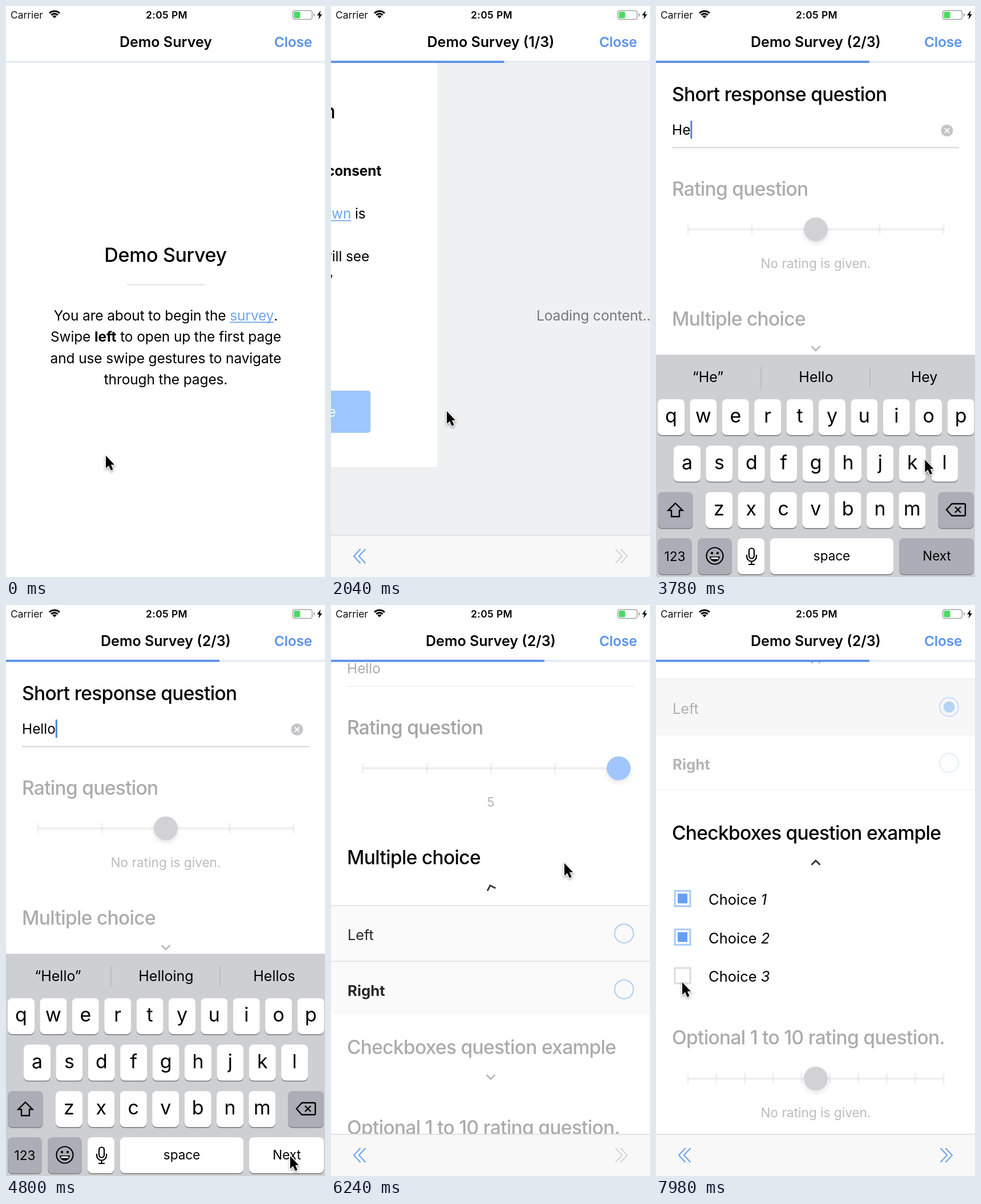
Animation of 559 by 1002 pixels, one loop 8000 ms. Source, as an HTML page with a canvas:

```html
<!DOCTYPE html>
<html lang="en">
<head>
<meta charset="utf-8">
<title>Survey demo</title>
<style>
html, body { margin: 0; width: 100%; height: 100%; overflow: hidden; background: #fff; }
canvas { display: block; width: 559px; height: 1002px; }
</style>
</head>
<body>
<canvas id="stage" width="559" height="1002"></canvas>
<script>
const ctx = document.getElementById('stage').getContext('2d');
const W = 559, H = 1002, LOOP = 8000;
const BLUE = '#649ff4', LINK = '#6ea6ef', GREY = '#d6d6d6';
let t = 0;

// ---- timing ----
const clamp = v => Math.max(0, Math.min(1, v));
const ease = p => p < .5 ? 2 * p * p : 1 - 2 * (1 - p) ** 2;
const ramp = (start, length) => ease(clamp((t - start) / length));
const mix = (a, b, p) => a + (b - a) * p;
const between = (a, b) => t >= a && t < b;

function track(keys) {
  const i = keys.findIndex(k => k[0] > t);
  if (i === 0) return keys[0].slice(1);
  if (i < 0) return keys[keys.length - 1].slice(1);
  const a = keys[i - 1], b = keys[i], p = ease((t - a[0]) / (b[0] - a[0]));
  return a.slice(1).map((v, j) => mix(v, b[j + 1], p));
}

const POINTER = [
  [60, 174, 787], [420, 62, 720], [860, 62, 720], [1080, 58, 611], [1220, 58, 611],
  [1600, 202, 709], [2400, 202, 709], [2900, 335, 800], [3080, 335, 800], [3400, 139, 722],
  [3540, 139, 722], [3800, 474, 795], [4120, 500, 800], [4290, 477, 722], [4380, 477, 722],
  [4720, 497, 965], [4920, 497, 965], [5380, 284, 394], [5480, 284, 394], [5880, 452, 396],
  [6000, 452, 396], [6200, 408, 451], [6260, 408, 451], [6560, 400, 540], [6780, 400, 540],
  [7460, 46, 515], [7640, 46, 515], [7780, 46, 584], [7860, 46, 584], [7980, 45, 660]
];
const KEY_TIMES = [3000, 3480, 3880, 4080, 4340];
const SUGGESTIONS = ['I|The|I’m', '“H”|Hey|Hello', '“He”|Hello|Hey', '“Hel”|Hello|Help',
  '“Hell”|Hello|Hells', '“Hello”|Helloing|Hellos'];
const FOCUS = [1900, 4860, 6000, 6800, 9e9, 9e9];
const FADE = 280;

// ---- drawing helpers ----
function box(x, y, w, h, fill, r = 0) {
  ctx.fillStyle = fill;
  ctx.beginPath();
  ctx.roundRect(x, y, w, h, r);
  ctx.fill();
}

function frame(x, y, w, h, color, width, r = 0) {
  ctx.strokeStyle = color;
  ctx.lineWidth = width;
  ctx.beginPath();
  ctx.roundRect(x, y, w, h, r);
  ctx.stroke();
}

function dot(x, y, r, fill) {
  ctx.fillStyle = fill;
  ctx.beginPath();
  ctx.arc(x, y, r, 0, 7);
  ctx.fill();
}

function ring(x, y, r, color, width, from = 0, to = 7) {
  ctx.strokeStyle = color;
  ctx.lineWidth = width;
  ctx.beginPath();
  ctx.arc(x, y, r, from, to);
  ctx.stroke();
}

function line(d, color, width) {
  ctx.strokeStyle = color;
  ctx.lineWidth = width;
  ctx.stroke(new Path2D(d));
}

function shape(d, fill) {
  ctx.fillStyle = fill;
  ctx.fill(new Path2D(d));
}

function shadowed(color, blur, offset, draw) {
  ctx.save();
  ctx.shadowColor = color;
  ctx.shadowBlur = blur;
  ctx.shadowOffsetY = offset;
  draw();
  ctx.restore();
}

function setFont(size, weight = 400, spacing = 0) {
  ctx.font = `${weight} ${size}px Inter, sans-serif`;
  ctx.letterSpacing = spacing + 'px';
}

function text(s, x, y, size, { weight, color = '#000', align = 'left', spacing } = {}) {
  setFont(size, weight, spacing);
  ctx.textAlign = align;
  ctx.fillStyle = color;
  ctx.fillText(s, x, y);
}

// *bold* and _link_ runs; the line is centred on x if asked
function rich(s, x, y, centred) {
  const runs = s.split(/(\*[^*]+\*|_[^_]+_)/).filter(Boolean).map(run => {
    const bold = run[0] === '*', link = run[0] === '_';
    const label = bold || link ? run.slice(1, -1) : run;
    setFont(24.5, bold ? 700 : 400, -.13);
    return { label, bold, link, width: ctx.measureText(label).width };
  });
  if (centred) x -= runs.reduce((sum, r) => sum + r.width, 0) / 2;
  for (const r of runs) {
    text(r.label, x, y, 24.5, { weight: r.bold ? 700 : 400, color: r.link ? LINK : '#000', spacing: -.13 });
    if (r.link) box(x, y + 2.5, r.width, 1.7, LINK);
    x += r.width;
  }
}

function moved(x, y, draw) {
  ctx.save();
  ctx.translate(x, y);
  draw();
  ctx.restore();
}

function clipped(x, y, w, h, draw) {
  ctx.save();
  ctx.beginPath();
  ctx.rect(x, y, w, h);
  ctx.clip();
  draw();
  ctx.restore();
}

const divider = y => box(212, y - 1, 136, 2, '#e3e3e4');
const heading = (s, y) => text(s, 28, y + 12.5, 33.5, { weight: 500, spacing: -.7 });

// ---- pages ----
function loading() {
  box(0, 96, W, H, '#eff0f1');
  text('Loading content...', 280, 552, 24.6, { color: '#777', align: 'center', spacing: -.15 });
}

function introPage() {
  box(0, 96, W, H, '#fff');
  text('Demo Survey', 279.5, 449, 34, { weight: 500, align: 'center', spacing: -.35 });
  divider(489);
  ['You are about to begin the _survey_.', 'Swipe *left* to open up the first page',
    'and use swipe gestures to navigate', 'through the pages.']
    .forEach((s, i) => rich(s, 280, 551.5 + 37.6 * i, true));
}

function consentPage() {
  if (t < 600) return loading();
  const agreed = t >= 1150;
  box(0, 96, W + 3, 713, '#fff');
  text('Consent form', 279, 197, 33.5, { weight: 500, align: 'center', spacing: -.95 });
  divider(235.5);
  ['This is an example of a *consent*', '*form*.', 'Most features in _Markdown_ is', 'supported!',
    'On the next page, you will see', 'different types of survey', 'components.'].forEach((s, i) => {
    rich(s, 98, 298 + 37.6 * i);
    if (i % 2 === 0 && i < 6) dot(66, 291 + 37.6 * i, 4, '#000');
  });
  divider(560);
  checkbox(60, 612, agreed);
  text('Like', 98, 622, 22.7);
  box(115, 675, 330, 74, agreed && t < 1700 ? BLUE : '#9dc6fd', 5);
  text('Agree & Continue', 280, 721, 25.2, { color: 'rgba(255,255,255,.88)', align: 'center' });
}

function checkbox(x, y, on) {
  frame(x - 13.5, y - 13.5, 27, 27, on ? '#a9c9f9' : '#dcdcde', 3);
  if (on) box(x - 8.5, y - 8.5, 17, 17, BLUE);
}

function section(i, draw) {
  const alpha = .33 + .67 * (ramp(FOCUS[i], FADE) - ramp(FOCUS[i + 1], FADE));
  ctx.save();
  ctx.globalAlpha = alpha;
  draw(alpha);
  ctx.restore();
}

function chevron(y, turn) {
  moved(280, y, () => {
    ctx.rotate(Math.PI * turn);
    line('M-7.5 -4 L0 3.5 L7.5 -4', '#333', 3);
  });
}

function slider(y, steps, x, color, label, alpha) {
  box(56, y - 2, 448, 4, '#d2d2d2');
  for (let i = 0; i < steps; i++) box(54.5 + 448 * i / (steps - 1), y - 9, 3, 18, '#d2d2d2');
  text(label, 280, y + 68, 22.6, { color: '#333', align: 'center' });
  ctx.globalAlpha = 1;
  shadowed('rgba(0,0,0,.1)', 8, 4, () => dot(x, y, 21, '#fff'));
  ctx.globalAlpha = .57 + .43 * (alpha - .33) / .67;
  dot(x, y, 21, color);
}

function option(y, label, weight, on) {
  box(0, y, W, 98, on ? '#e5e5e6' : '#fafafa');
  box(0, y, W, 1.5, '#dcdcdc');
  text(label, 29, y + 61.5, weight > 400 ? 25.8 : 25.3, { weight, color: '#222' });
  ring(513.5, y + 50, 16.5, on ? BLUE : '#a9cbf5', 2);
  if (on) dot(513.5, y + 50, 10, '#3a8ef0');
}

function questionsPage() {
  if (t < 2240) return loading();
  const openRadios = ramp(6000, 310), openChecks = ramp(6800, 310);
  const scroll = 149 * ramp(6000, 390) + 354 * ramp(6800, 390);
  const typed = 'Hello'.slice(0, KEY_TIMES.filter(k => t >= k).length);
  const editing = t < 4860;
  box(0, 96, W, H, '#fff');

  moved(0, -scroll, () => {
    section(0, () => {
      heading('Short response question', 154);
      text(typed, 28, 226, 24.4);
      const caret = 28 + ctx.measureText(typed).width;
      box(28, 247.5, 503, 2, '#d4d4d6');
      if (!editing) return;
      box(caret, 201, 3, 32, '#4d83e2', 1);
      if (typed) {
        dot(510, 218.5, 10.5, '#c5c5c8');
        line('M506 214.5 l8 8 M514 214.5 l-8 8', '#fff', 2);
      }
    });

    section(1, alpha => {
      const [x] = track([[5480, 280], [5880, 450], [5930, 450], [5990, 504]]);
      const rated = t >= 5480;
      heading('Rating question', 320);
      slider(392, 5, x, rated ? '#5f9ffb' : '#b0b1b8',
        rated ? Math.round((x - 56) / 112) + 1 : 'No rating is given.', alpha);
    });

    section(2, () => {
      heading('Multiple choice', 548);
      chevron(601, openRadios);
      clipped(0, 632, W, 213 * openRadios, () => {
        option(632, 'Left', 400, t >= 6640);
        option(730, 'Right', 700, false);
        box(0, 827, W, 1.5, '#dcdcdc');
      });
    });

    const y = 689 + 213 * openRadios;
    section(3, () => {
      heading('Checkboxes question example', y);
      chevron(y + 53, openChecks);
      clipped(0, y + 84, W, 218 * openChecks, () => [7600, 7820, 9e9].forEach((at, i) => {
        const row = y + 116 + 67.7 * i;
        checkbox(46.5, row, t >= at);
        text('Choice ', 92, row + 11, 25.5);
        text(i + 1, 92 + ctx.measureText('Choice ').width, row + 11, 25.5, { weight: 'italic 400' });
      }));
    });

    const last = y + 141 + 218 * openChecks;
    section(4, alpha => {
      heading('Optional 1 to 10 rating question.', last);
      slider(last + 73, 10, 280, '#b0b1b8', 'No rating is given.', alpha);
    });
  });
}

// ---- fixed parts ----
function header(page) {
  box(0, 0, W, 96, '#fff');
  text('Carrier', 8, 22, 17.4, { color: '#111' });
  [[2.5, 5], [8, 3], [12.5, 3]].forEach(([r, w]) => ring(85, 21.5, r, '#000', w, -Math.PI * .75, -Math.PI * .25));
  text('2:05 PM', 281.5, 22, 17.4, { weight: 600, align: 'center', spacing: .4 });
  frame(502.5, 8, 34, 15.5, '#a3a3a5', 1.6, 4);
  box(504.5, 10, 11, 11.5, '#4cd964', 2);
  box(539, 13, 2, 5.5, '#a3a3a5', 1);
  shape('M551.5 8 L545 16.5 H549 L547.5 23.5 L554 14.5 H550 Z', '#000');
  text('Demo Survey' + (page ? ` (${page}/3)` : ''), 280, 72, 25, { weight: 600, align: 'center' });
  text('Close', 470, 72, 24.5, { weight: 600, color: '#5c93ea', spacing: -.2 });
  box(0, 96, W, 4, '#e6ecf7');
  box(0, 96, 186 * ramp(120, 440) + 188 * ramp(1803, 420), 4, '#6095e8');
}

function toolbar() {
  moved(0, 74 * (1 - ramp(200, 400)), () => {
    box(0, 928, W, 74, '#f8f8f8');
    box(0, 928, W, 1.5, '#dcdcdd');
    const ready = between(1150, 1760) || t >= 7680;
    line('M51.5 953 L40 965.5 L51.5 978 M60.5 953 L49 965.5 L60.5 978', LINK, 2.2);
    line('M498.5 953 L510 965.5 L498.5 978 M507.5 953 L519 965.5 L507.5 978', ready ? LINK : GREY, 2.2);
  });
}

function key(x, y, w, dark) {
  box(x, y + 2, w, 63, '#8b8d91', 8);
  box(x, y, w, 63, dark ? '#abaeb6' : '#fff', 8);
}

function keyboard() {
  const shown = ramp(2260, 260) - ramp(4820, 220);
  if (!shown) return;
  const count = KEY_TIMES.filter(k => t >= k).length;
  const upper = count === 0;
  moved(0, 390 * (1 - shown), () => {
    box(0, 612, W, 390, '#cecfd2');
    [184, 375].forEach(x => box(x - .75, 633, 1.5, 37, '#b6b7bb'));
    SUGGESTIONS[count].split('|').forEach((s, i) => text(s, 91 + 189.5 * i, 660, 25, { align: 'center' }));
    ['qwertyuiop', 'asdfghjkl', 'zxcvbnm'].forEach((row, r) => [...row].forEach((c, i) => {
      const x = [3, 31, 87][r] + 56.4 * i, y = 690 + 81.5 * r;
      key(x, y, 47);
      text(upper ? c.toUpperCase() : c, x + 23.5, y + (upper ? 43 : 41), upper ? 32 : 34, { align: 'center' });
    }));

    key(3, 853, 62, !upper);
    const arrow = 'M34 872.5 L46.5 885 H41 V896 H27 V885 H21.5 Z';
    if (upper) shape(arrow, '#000');
    line(arrow, '#000', 2.4);
    key(494, 853, 63, true);
    line('M509 884 L518.5 873.5 H540 Q542 873.5 542 875.5 V892.5 Q542 894.5 540 894.5 H518.5 Z', '#000', 2.4);
    line('M524 879 l10 10 M534 879 l-10 10', '#000', 2.4);

    key(3, 934, 60, true);
    text('123', 33, 974, 22.7, { align: 'center' });
    key(73, 934, 60, true);
    ring(103, 965, 14.5, '#000', 2.2);
    dot(98, 960, 2.2, '#000');
    dot(108, 960, 2.2, '#000');
    shape('M94 966 H112 A9 9 0 0 1 94 966 Z', '#000');
    box(96.5, 967.5, 13, 3, '#fff', 1);
    key(143, 934, 47);
    frame(163, 951.5, 9, 18, '#000', 2.2, 4.5);
    line('M159 963 V966 A8.5 8.5 0 0 0 176 966 V963 M167.5 974.5 V980 M162 980 H173', '#000', 2.2);
    key(200, 934, 216);
    text('space', 308, 973, 22.5, { align: 'center' });
    key(426, 934, 131, upper || !between(4740, 5100));
    text('Next', 492, 973, 22.5, { align: 'center', color: upper ? '#777' : '#000' });
  });
}

function pointer() {
  const [x, y] = track(POINTER);
  moved(x + 1, y + 2, () => {
    const arrow = 'M0 0 V22 L5 17.5 L8.8 26 L12.6 24.2 L9 16 H15 Z';
    shadowed('rgba(0,0,0,.4)', 4, 2, () => line(arrow, '#fff', 2.5));
    shape(arrow, '#000');
  });
}

function draw(now) {
  t = now % LOOP;
  box(0, 0, W, H, '#eff0f1');
  const position = ramp(120, 440) + ramp(1803, 400);
  [introPage, consentPage, questionsPage].forEach((page, i) => {
    if (Math.abs(i - position) < 1) moved((i - position) * W, 0, page);
  });
  // the leaving page overhangs the next one slightly
  if (position > 1 && position < 2) box((2 - position) * W, 96, 3, 713, '#fff');
  toolbar();
  header(t < 540 ? 0 : t < 2200 ? 1 : 2);
  keyboard();
  pointer();
}

const start = performance.now();
(function tick() {
  draw(performance.now() - start);
  requestAnimationFrame(tick);
})();
</script>
</body>
</html>
```
